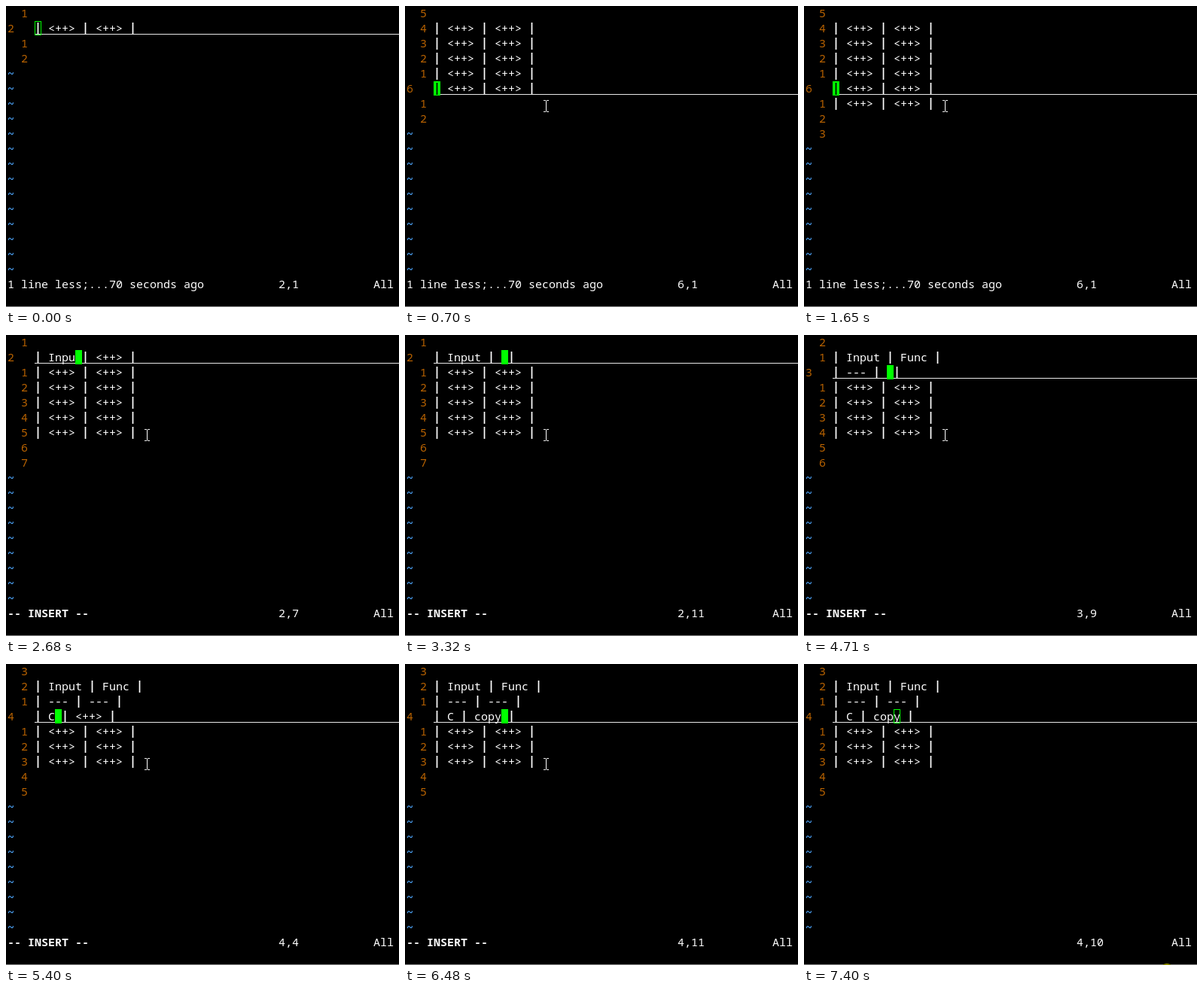
Animation, 522 px wide and 400 px high, one loop 7550 ms. Source, as an HTML page with a canvas:

```html
<!DOCTYPE html>
<html lang="en">
<head>
<meta charset="utf-8">
<title>Table editing</title>
<style>
  html, body { margin: 0; width: 100%; height: 100%; overflow: hidden; background: #000; }
  canvas { display: block; }
</style>
</head>
<body>
<canvas id="stage" width="522" height="400"></canvas>
<script>
const ctx = document.getElementById('stage').getContext('2d');
const LOOP = 7550;
const CELL_W = 9, CELL_H = 20, LEFT = 2, GUTTER = 4, TEXT_ROWS = 18;
const FONT = '15px "Noto Sans Mono", "DejaVu Sans Mono", monospace';
const WHITE = '#fff', LINE = '#e8e8e8', ORANGE = '#b86200', BLUE = '#4fa8ff', GREEN = '#00ff00';
const SLOT = '<++>';

// Key presses: time in ms, then the action or typed character.
const keys = [
  [70, 'focus'], [226, 'paste'], [382, 'paste'], [538, 'paste'], [694, 'paste'], [850, 'paste'],
  [1250, 'escape'],
  [1650, 'up'], [1730, 'up'], [1820, 'up'], [1910, 'up'], [2000, 'up'],
  [2280, 'jump'], [2430, 'I'], [2520, 'n'], [2600, 'p'], [2680, 'u'], [2740, 't'],
  [2840, 'escape'], [3140, 'settle'],
  [3200, 'jump'], [3330, 'F'], [3400, 'u'], [3460, 'n'], [3520, 'c'], [3620, 'escape'],
  [3780, 'jump'], [3880, '-'], [4030, '-'], [4110, '-'], [4410, 'escape'],
  [4640, 'jump'], [4740, '-'], [4850, '-'], [4930, '-'], [5030, 'escape'],
  [5260, 'jump'], [5400, 'C'], [5630, 'escape'], [5930, 'settle'],
  [6030, 'jump'], [6180, 'c'], [6280, 'o'], [6380, 'p'], [6480, 'y'], [6630, 'escape'],
  [6930, 'settle'], [6930, 'hideMouse'], [7400, 'blur']
];

const actions = {
  focus(s) { s.focused = s.mouse = true; },
  paste(s) { s.lines.splice(s.row + 1, 0, s.lines[s.row]); s.row++; },
  up(s) { s.row--; s.pending = ''; },
  escape(s) {
    s.pending = '^[';
    if (!s.insert) return;
    s.insert = s.ruler = false;
    s.col--;
  },
  settle(s) { s.ruler = true; s.pending = ''; },
  jump(s) {
    s.row = s.lines.findIndex(line => line.includes(SLOT));
    s.col = s.lines[s.row].indexOf(SLOT);
    s.lines[s.row] = s.lines[s.row].replace(SLOT, '');
    s.insert = s.ruler = true;
    s.message = s.pending = '';
  },
  hideMouse(s) { s.mouse = false; },
  blur(s) { s.focused = false; s.glow = true; }
};

function type(s, ch) {
  const line = s.lines[s.row];
  s.lines[s.row] = line.slice(0, s.col) + ch + line.slice(s.col);
  s.col++;
}

const history = [{
  time: 0, lines: ['', `| ${SLOT} | ${SLOT} |`, '', ''], row: 1, col: 0,
  message: '1 line less;...70 seconds ago', pending: '',
  insert: false, ruler: true, focused: false, mouse: false, glow: false
}];
for (const [time, key] of keys) {
  const last = history[history.length - 1];
  const next = { ...last, time, lines: [...last.lines] };
  if (actions[key]) actions[key](next);
  else type(next, key);
  history.push(next);
}

function rect(color, x, y, w, h) {
  ctx.fillStyle = color;
  ctx.fillRect(x, y, w, h);
}

function write(text, col, row, color = WHITE, bold = false) {
  ctx.font = (bold ? 'bold ' : '') + FONT;
  ctx.fillStyle = color;
  [...text].forEach((ch, i) => {
    const x = LEFT + (col + i) * CELL_W, y = row * CELL_H;
    if (ch === '|') ctx.fillRect(x + 3.65, y + 2, 1.7, 16);
    else ctx.fillText(ch, x, y + 15);
  });
}

function drawCursor(s) {
  const x = LEFT + (GUTTER + s.col) * CELL_W, y = s.row * CELL_H;
  if (s.focused) {
    rect(GREEN, x, y, CELL_W, CELL_H - 1);
    write(s.lines[s.row][s.col] || ' ', GUTTER + s.col, s.row, '#000');
  } else {
    ctx.strokeStyle = GREEN;
    ctx.lineWidth = 1;
    ctx.strokeRect(x + 0.5, y + 0.5, CELL_W - 1, CELL_H - 2);
  }
}

function drawBar(s) {
  if (s.insert) write('-- INSERT --', 0, TEXT_ROWS, WHITE, true);
  else write(s.message, 0, TEXT_ROWS);
  write(s.pending, 30, TEXT_ROWS);
  if (!s.ruler) return;
  write(`${s.row + 1},${s.col + 1}`, 40, TEXT_ROWS);
  write('All', 54, TEXT_ROWS);
}

function drawMouse() {
  rect(WHITE, 187, 126, 1, 14);
  for (const y of [125, 140]) {
    rect(WHITE, 184, y, 3, 1);
    rect(WHITE, 188, y, 3, 1);
  }
}

function draw(s) {
  rect('#000', 0, 0, 522, 400);
  for (let row = 0; row < TEXT_ROWS; row++) {
    if (row >= s.lines.length) {
      write('~', 0, row, BLUE, true);
      continue;
    }
    const current = row === s.row;
    const label = String(current ? row + 1 : Math.abs(row - s.row));
    write(label, current ? 0 : 3 - label.length, row, ORANGE);
    write(s.lines[row], GUTTER, row);
  }
  rect(LINE, 38, s.row * CELL_H + 17, 484, 1);
  drawCursor(s);
  drawBar(s);
  rect('#808080', 0, 399, 522, 1);
  if (s.mouse) drawMouse();
  if (s.glow) {
    ctx.fillStyle = '#8c8c00';
    ctx.beginPath();
    ctx.arc(482, 407, 9, 0, Math.PI * 2);
    ctx.fill();
  }
}

const start = performance.now();
function tick() {
  const time = (performance.now() - start) % LOOP;
  draw(history.filter(s => s.time <= time).pop());
  requestAnimationFrame(tick);
}
tick();
</script>
</body>
</html>
```
